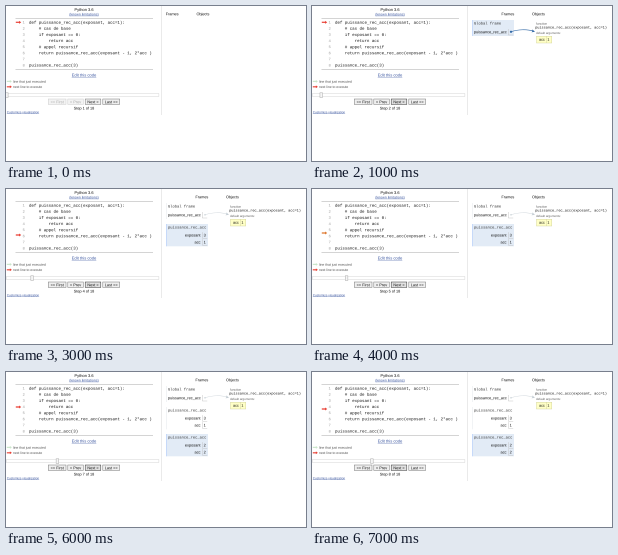
These frames come from a looping animation (300 by 155 pixels, 8 s). An HTML page with a canvas:

```html
<!DOCTYPE html>
<html lang="en">
<head>
<meta charset="utf-8">
<title>Code stepper</title>
<style>
  html, body { margin: 0; width: 100%; height: 100%; overflow: hidden; background: #fff; }
  canvas { display: block; width: 300px; height: 155px; }
</style>
</head>
<body>
<canvas id="stage"></canvas>
<script>
const WIDTH = 300, HEIGHT = 155, STEP_MS = 1000, SHOWN_STEPS = 8, TOTAL_STEPS = 18;
const DETAIL = 4;
const SANS = '"Liberation Sans", Arial, sans-serif';
const MONO = '"Liberation Mono", "Courier New", monospace';
const RED = '#e93f34', GREEN = '#c9e6ca', LINK = '#3d58a2';
const FUNC = 'puissance_rec_acc';
const CODE = [
  `def ${FUNC}(exposant, acc=1):`,
  '    # cas de base',
  '    if exposant == 0:',
  '        return acc',
  '    # appel recursif',
  `    return ${FUNC}(exposant - 1, 2*acc )`,
  '',
  `${FUNC}(3)`
];
// Pointer height caught at each step while it glides between lines.
const POINTER_Y = [16.3, 16.3, 16.3, 46, 44, 31, 35, 37];

const canvas = document.getElementById('stage');
const view = canvas.getContext('2d');
const ratio = window.devicePixelRatio || 1;
canvas.width = WIDTH * ratio;
canvas.height = HEIGHT * ratio;
view.imageSmoothingQuality = 'high';

// The page is laid out large and scaled down, so tiny letters keep their shape.
const page = document.createElement('canvas');
page.width = canvas.width * DETAIL;
page.height = canvas.height * DETAIL;
const ctx = page.getContext('2d');
ctx.scale(ratio * DETAIL, ratio * DETAIL);
ctx.textRendering = 'geometricPrecision';

function text(str, x, y, size, { color = '#111', font = SANS, align = 'left', underline = false } = {}) {
  ctx.font = `${size}px ${font}`;
  ctx.textAlign = align;
  ctx.fillStyle = color;
  const base = y + size * 0.34;
  ctx.fillText(str, x, base);
  if (!underline) return;
  const w = ctx.measureText(str).width;
  const left = align === 'center' ? x - w / 2 : x;
  ctx.fillRect(left, base + 0.4, w, 0.3);
}

function rect(x, y, w, h, fill, stroke, lineWidth = 0.4) {
  if (fill) {
    ctx.fillStyle = fill;
    ctx.fillRect(x, y, w, h);
  }
  if (stroke) {
    ctx.strokeStyle = stroke;
    ctx.lineWidth = lineWidth;
    ctx.strokeRect(x, y, w, h);
  }
}

function line(x1, y1, x2, y2, color, width = 0.4) {
  ctx.strokeStyle = color;
  ctx.lineWidth = width;
  ctx.beginPath();
  ctx.moveTo(x1, y1);
  ctx.lineTo(x2, y2);
  ctx.stroke();
}

function pointer(x, y, color, scale = 0.3) {
  ctx.save();
  ctx.translate(x, y);
  ctx.scale(scale, scale);
  ctx.fillStyle = color;
  ctx.beginPath();
  for (const [px, py] of [[0, -2], [11, -2], [11, -5], [18, 0], [11, 5], [11, 2], [0, 2]]) ctx.lineTo(px, py);
  ctx.fill();
  ctx.restore();
}

function drawCode(step) {
  text('Python 3.6', 78, 3.7, 4, { align: 'center' });
  text('(known limitations)', 78, 8.2, 3.55, { align: 'center', color: LINK, underline: true });
  line(9.5, 12.6, 147, 12.6, '#aaa', 0.5);
  line(9.5, 63.4, 147, 63.4, '#aaa', 0.5);
  CODE.forEach((row, i) => {
    const y = 16.3 + i * 6.12;
    text(i + 1, 18.8, y, 3.7, { font: MONO, color: '#999', align: 'right' });
    text(row, 23, y, 4.1, { font: MONO });
  });
  pointer(9.8, POINTER_Y[step - 1], step === 5 ? '#de772d' : RED);
}

function button(label, x, w, { disabled = false, focused = false } = {}) {
  const border = disabled ? '#ccc' : focused ? '#333' : '#777';
  rect(x, 93, w, 5.4, disabled ? '#f3f3f3' : focused ? '#e2e2e2' : '#efefef', border, 0.5);
  text(label, x + w / 2, 95.8, 3.9, { align: 'center', color: disabled ? '#aaa' : '#111' });
}

function drawControls(step) {
  text('Edit this code', 78, 69.2, 4.1, { align: 'center', color: LINK, underline: true });
  pointer(0.8, 75.4, GREEN, 0.28);
  pointer(0.8, 80.8, RED, 0.28);
  text('line that just executed', 7, 75.6, 3.4, { color: '#555' });
  text('next line to execute', 7, 80.9, 3.4, { color: '#555' });

  rect(0.3, 87.6, 152.6, 2.8, '#fff', '#ccc');
  rect(8.44 * (step - 1) - 0.5, 86.8, 2.6, 4.6, '#f6f6f6', '#aaa', 0.5);

  const atStart = step === 1;
  button('<< First', 42.3, 17.7, { disabled: atStart });
  button('< Prev', 61.8, 15.5, { disabled: atStart });
  button('Next >', 79.2, 15.6, { focused: !atStart });
  button('Last >>', 96.8, 16.8);
  text(`Step ${step} of ${TOTAL_STEPS}`, 78, 102.1, 3.8, { align: 'center' });
  text('Customize visualization', 0.8, 106.1, 3.1, { color: LINK, underline: true });
}

function frame(title, top, height, active) {
  if (active) rect(160, top, 42, height, '#e2ebf6');
  line(160.2, top, 160.2, top + height, active ? '#9ebeff' : '#dde3e8');
  text(title, 162, top + 3.3, 3.77, { font: MONO, color: '#333' });
}

function valueBorder(y) {
  line(196.3, y - 3, 196.3, y + 3, '#bbb');
  line(196.3, y + 3, 201.2, y + 3, '#bbb');
}

function variable(name, value, y) {
  text(name, 194.5, y, 3.85, { align: 'right' });
  valueBorder(y);
  text(value, 198.7, y, 3.85, { align: 'center' });
}

function connector(active) {
  ctx.strokeStyle = ctx.fillStyle = active ? '#2f67a5' : '#c3ccd3';
  ctx.lineWidth = active ? 0.6 : 0.35;
  ctx.beginPath();
  ctx.moveTo(199, 25.8);
  ctx.bezierCurveTo(206, 23.2, 215, 23.2, 222, 25.2);
  ctx.stroke();
  ctx.beginPath();
  ctx.arc(199, 25.8, active ? 1.1 : 0.7, 0, Math.PI * 2);
  ctx.fill();
  ctx.beginPath();
  for (const [x, y] of [[223, 25.7], [220.2, 23.4], [220.6, 24.9], [219.5, 26.3]]) ctx.lineTo(x, y);
  ctx.fill();
}

function drawFunction() {
  text('function', 224, 17.6, 3.2, { color: '#666' });
  text(`${FUNC}(exposant, acc=1)`, 223.2, 21.4, 3.53, { font: MONO });
  text('default arguments:', 224, 27, 3, { color: '#666' });
  rect(224.4, 30.2, 15.4, 6.8, '#ffffc6', '#cfcf9c');
  line(234.2, 30.2, 234.2, 37, '#cfcf9c');
  text('acc', 232.8, 33.6, 3.7, { align: 'right' });
  text('1', 236.4, 33.6, 3.7, { align: 'center' });
}

function drawMemory(step) {
  line(155.5, 0, 155.5, 109, '#ddd', 0.6);
  const started = step > 1;
  text('Frames', started ? 202.3 : 172.6, 8, 3.8, { align: 'right' });
  text('Objects', started ? 220 : 190.5, 8, 3.8);
  if (!started) return;

  frame('Global frame', 14, 16, step === 2);
  text(FUNC, 194.8, 26, 3.85, { align: 'right' });
  valueBorder(26);
  drawFunction();
  connector(step === 2);

  const calls = [{ top: 35, exposant: 3, acc: 1, from: 3 }, { top: 62, exposant: 2, acc: 2, from: 6 }];
  const open = calls.filter(call => step >= call.from);
  open.forEach((call, i) => {
    frame(FUNC, call.top, 22.3, i === open.length - 1);
    variable('exposant', call.exposant, call.top + 11.2);
    variable('acc', call.acc, call.top + 18.2);
  });
}

let shownStep = 0;

function draw() {
  const step = Math.floor(performance.now() / STEP_MS) % SHOWN_STEPS + 1;
  if (step !== shownStep) {
    shownStep = step;
    rect(0, 0, WIDTH, HEIGHT, '#fff');
    drawCode(step);
    drawControls(step);
    drawMemory(step);
    view.drawImage(page, 0, 0, canvas.width, canvas.height);
  }
  requestAnimationFrame(draw);
}
draw();
</script>
</body>
</html>
```
